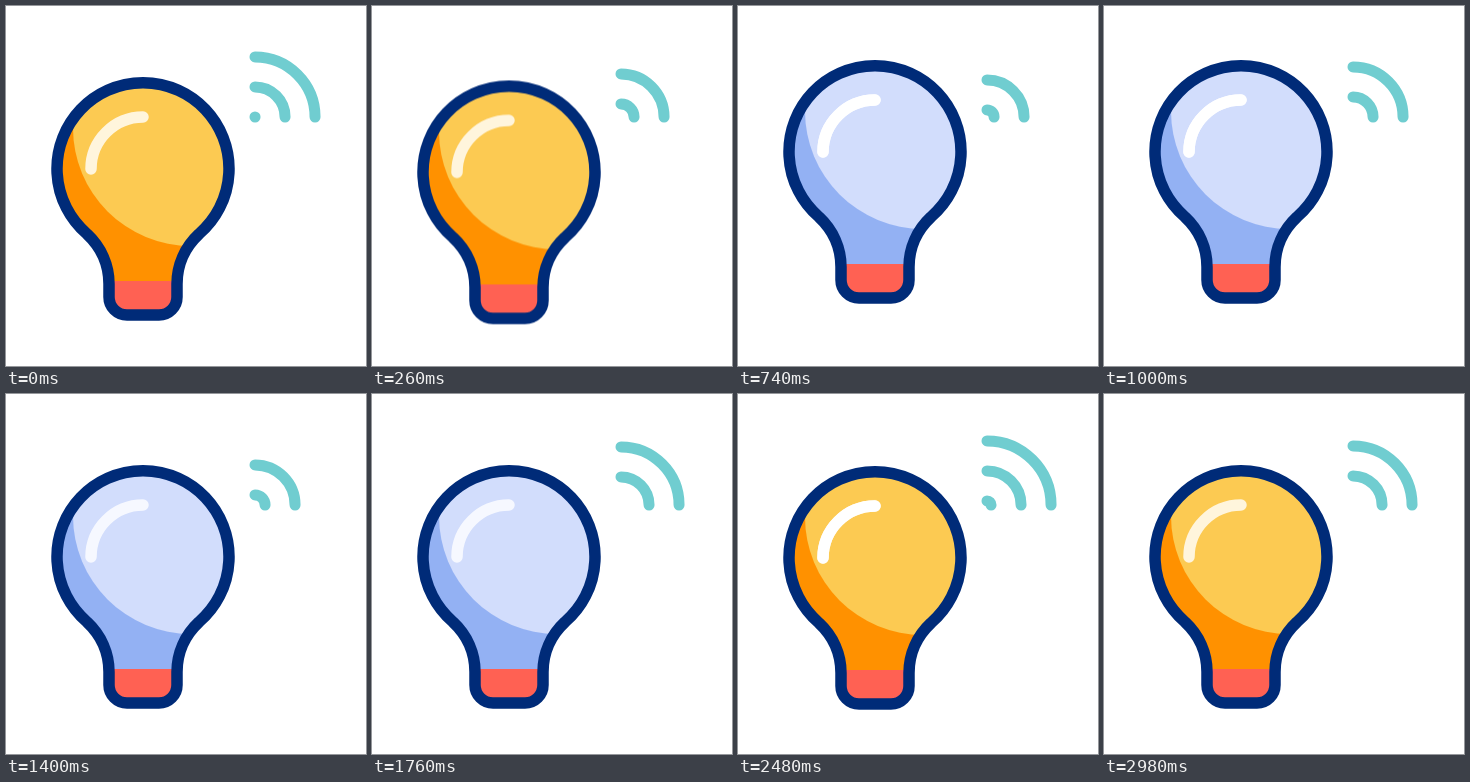
Animation of 360x360 px, one loop 3 s. Source, as an HTML page:

```html
<!DOCTYPE html>
<html lang="en">
<head>
<meta charset="utf-8">
<title>Smart bulb</title>
<style>
  html, body { margin: 0; width: 100%; height: 100%; overflow: hidden; background: #fff; }
  svg { display: block; width: 100vmin; height: 100vmin; }
  path { fill: none; stroke-linecap: round; stroke-linejoin: round; }

  .hop, .tilt, .on, .ray, .shine { animation: 3s linear infinite; }
  .hop { animation-name: hop; }
  .tilt { animation-name: tilt; transform-origin: 137px 309px; }
  .on { animation-name: lit; animation-timing-function: step-end; }

  .outline { stroke: #002b78; stroke-width: 11.5; }
  .gloss { stroke: #fff; stroke-width: 11.5; }
  .soft { opacity: .8; }
  .shine { stroke-dasharray: 1 3; animation-name: shine; }
  .ray { stroke: #ffc454; stroke-width: 11; stroke-dasharray: 1 3; animation-name: ray; }
  .wave { stroke: #70cdd0; stroke-width: 11; animation: wave 1.8s linear infinite; }
  .wave:nth-of-type(2) { animation-delay: -.6s; }
  .wave:nth-of-type(3) { animation-delay: -1.2s; }

  @keyframes hop {
    0%, 6% { transform: translateY(0); animation-timing-function: ease-in-out; }
    11.5% { transform: translateY(7px); animation-timing-function: ease-in-out; }
    17.333% { transform: translateY(-13px); animation-timing-function: ease-out; }
    20%, 33.4% { transform: translateY(-17px); animation-timing-function: ease-in; }
    36% { transform: translateY(-11px); animation-timing-function: ease-out; }
    40.5% { transform: translateY(8px); animation-timing-function: ease-in-out; }
    46.667%, 73% { transform: translateY(0); animation-timing-function: ease-in-out; }
    78% { transform: translateY(8px); animation-timing-function: ease-in-out; }
    82.667% { transform: translateY(1px); animation-timing-function: ease-out; }
    84%, 100% { transform: translateY(0); }
  }
  @keyframes tilt {
    0%, 13% { transform: rotate(0); animation-timing-function: ease-out; }
    17.333% { transform: rotate(2.4deg); animation-timing-function: ease-in-out; }
    23%, 100% { transform: rotate(0); }
  }
  @keyframes lit {
    0% { opacity: 1; }
    14% { opacity: 0; }
    78% { opacity: 1; }
  }
  @keyframes shine {
    0%, 15% { stroke-dashoffset: 1; opacity: 0; }
    15.1% { stroke-dashoffset: 1; opacity: 1; }
    17.333% { stroke-dashoffset: .65; }
    22%, 35% { stroke-dashoffset: 0; opacity: 1; }
    43%, 73% { stroke-dashoffset: 0; opacity: 0; }
    73.1% { stroke-dashoffset: 1; opacity: 0; }
    73.2% { stroke-dashoffset: 1; opacity: 1; }
    80%, 84% { stroke-dashoffset: 0; opacity: 1; }
    92%, 100% { stroke-dashoffset: 0; opacity: 0; }
  }
  @keyframes ray {
    0%, 13.3% { stroke-dashoffset: 1; opacity: 0; }
    13.4% { stroke-dashoffset: .95; opacity: 1; }
    15.333%, 16% { stroke-dashoffset: 0; }
    18.1% { stroke-dashoffset: .9; opacity: 1; }
    18.2%, 100% { stroke-dashoffset: 1; opacity: 0; }
  }
  /* Each ring grows 50 px per second and vanishes at its rim. */
  @keyframes wave {
    0% { d: path("M249 110.99A.01 .01 0 0 1 249.01 111"); opacity: 1; }
    73.89% { d: path("M249 44.5A66.5 66.5 0 0 1 315.5 111"); opacity: 1; }
    73.9%, 100% { d: path("M249 44.5A66.5 66.5 0 0 1 315.5 111"); opacity: 0; }
  }
</style>
</head>
<body>
<svg viewBox="0 0 360 360">
  <defs>
    <path id="glass" d="M81 228A86 86 0 1 1 193 228C179 241 171 259 171 278V291A18 18 0 0 1 153 309H121A18 18 0 0 1 103 291V278C103 259 95 241 81 228Z"/>
    <clipPath id="inside"><use href="#glass"/></clipPath>
  </defs>

  <g>
    <path class="wave" d="M249 111h.01"/>
    <path class="wave" d="M249 81A30 30 0 0 1 279 111"/>
    <path class="wave" d="M249 51A60 60 0 0 1 309 111"/>
  </g>

  <path class="ray" pathLength="1" d="M78.5 53L72 36"/>
  <path class="ray" pathLength="1" d="M54 75L42.5 61"/>

  <g class="hop"><g class="tilt">
    <g clip-path="url(#inside)">
      <rect x="40" y="65" width="195" height="250" fill="#93b1f3"/>
      <circle cx="185" cy="122" r="118" fill="#d2ddfc"/>
      <g class="on">
        <rect x="40" y="65" width="195" height="250" fill="#ff9100"/>
        <circle cx="185" cy="122" r="118" fill="#fcca52"/>
      </g>
      <rect x="95" y="275" width="84" height="40" fill="#ff6153"/>
    </g>
    <use href="#glass" class="outline"/>
    <path class="gloss soft" d="M137 111A52 52 0 0 0 85 163"/>
    <path class="gloss shine" pathLength="1" d="M137 111A52 52 0 0 0 85 163"/>
  </g></g>
</svg>
</body>
</html>
```
